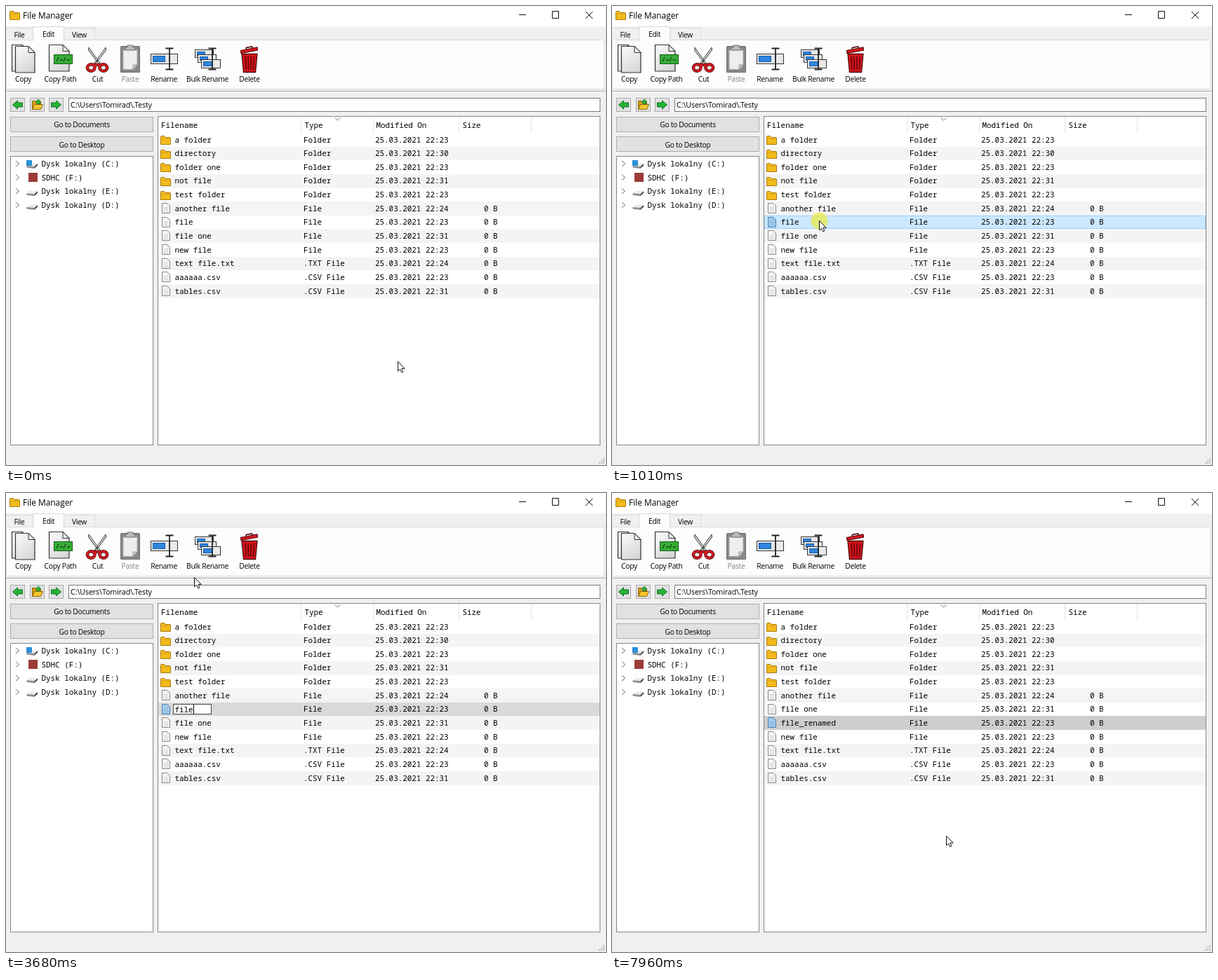
Recreate the animation shown at these times as an HTML page with a canvas. Size 855 by 655 pixels, loop 8000 ms.

```html
<!DOCTYPE html>
<html lang="en">
<head>
<meta charset="utf-8">
<title>File Manager</title>
<style>
html, body { margin: 0; width: 100%; height: 100%; overflow: hidden; background: #f0f0f0; }
canvas { display: block; }
</style>
</head>
<body>
<canvas id="stage" width="855" height="655"></canvas>
<script>
const ctx = document.getElementById('stage').getContext('2d');
const LOOP = 8000, ROW = 19.64, TOP = 181, CHAR = 6.54;
const SANS = '"Open Sans", "Noto Sans", sans-serif';
const MONO = '10.9px "Noto Sans Mono", "DejaVu Sans Mono", monospace';

// Cursor moves: start, end, number of steps, target x and y, bend of x and y
const MOVES = [
  [50, 830, 14, 295, 306, 0.4, -0.1],
  [1260, 1700, 8, 240, 101, 0, 0],
  [2130, 2190, 2, 254, 118, 1.4, 0],
  [3500, 3680, 3, 268, 120, 0, 0],
  [7540, 7960, 8, 476, 489, 0, 0]
];
const CLICKS = [[890, 1070], [1760, 1940]];
const CARET_OFF = [[2500, 3060], [4240, 4740], [6360, 6610]];
const SELECT = 890, EDIT = 1940, RETYPE = 3060, COMMIT = 6610;
const KEYS = [3060, 3190, 3310, 3680, 4870, 5060, 5173, 5287, 5400, 5513, 5627, 5740];
const NEW_NAME = 'file_renamed';

const FILES = [
  ['a folder', 'Folder', 23], ['directory', 'Folder', 30], ['folder one', 'Folder', 23],
  ['not file', 'Folder', 31], ['test folder', 'Folder', 23], ['another file', 'File', 24],
  ['file', 'File', 23], ['file one', 'File', 31], ['new file', 'File', 23],
  ['text file.txt', '.TXT File', 24], ['aaaaaa.csv', '.CSV File', 23], ['tables.csv', '.CSV File', 31]
];
const RENAMED = FILES.slice();
RENAMED[6] = FILES[7];
RENAMED[7] = [NEW_NAME, 'File', 23];

const within = (t, spans) => spans.some(([a, b]) => t >= a && t < b);

function box(x, y, w, h, fill, line) {
  ctx.fillStyle = fill;
  ctx.fillRect(x, y, w, h);
  if (line) {
    ctx.strokeStyle = line;
    ctx.lineWidth = 1;
    ctx.strokeRect(x + 0.5, y + 0.5, w - 1, h - 1);
  }
}

function shape(d, fill, line, width = 1) {
  const path = new Path2D(d);
  if (fill) { ctx.fillStyle = fill; ctx.fill(path); }
  if (line) { ctx.strokeStyle = line; ctx.lineWidth = width; ctx.stroke(path); }
}

function mono(str, x, y, color = '#000') {
  ctx.font = MONO;
  ctx.letterSpacing = '0px';
  ctx.textAlign = 'left';
  ctx.fillStyle = color;
  ctx.fillText(str, x, y);
}

function sans(str, x, y, { size = 10.3, gap = -0.3, align = 'center', color = '#000' } = {}) {
  ctx.font = size + 'px ' + SANS;
  ctx.letterSpacing = gap + 'px';
  ctx.textAlign = align;
  ctx.fillStyle = color;
  ctx.fillText(str, x, y);
}

function at(x, y, draw) {
  ctx.save();
  ctx.translate(x, y);
  draw();
  ctx.restore();
}

const folder = (x, y) => at(x, y, () => {
  shape('M.5 12.5V1.5Q.5 .5 1.5 .5H5.5L7 2.5H13.5Q14.5 2.5 14.5 3.5V12.5Z', '#f3bb1c', '#a87b10');
  shape('M1.5 4.5H14', null, '#dba414');
});

const page = (x, y, blue) => at(x, y, () => {
  shape('M.5 .5H8L11.5 4V14.5H.5Z', blue ? '#a3cdf0' : '#f8f8f8', blue ? '#4d7fa8' : '#858585');
  shape('M8 .5V4H11.5M2.5 6.5H9.5M2.5 8.5H9.5M2.5 10.5H9.5M2.5 12.5H9.5', null, blue ? '#8db9dc' : '#d4d4d4');
});

const sheet = (x, y, w, h) => at(x, y, () => {
  const g = ctx.createLinearGradient(0, 0, w, h);
  g.addColorStop(0, '#fcfcfc');
  g.addColorStop(1, '#d2d2d2');
  const c = w - 9;
  shape(`M.5 .5H${c}L${w} 9.5V${h}H.5Z`, g, '#333', 1.2);
  shape(`M${c} .5V9.5H${w}Z`, '#eee', '#333');
});

const drive = (x, y) => at(x, y, () => {
  shape('M0 3.5L5 0H15.5L11 4.5Z', '#e9e9e9');
  shape('M0 3.5L11 4.5V7.5L0 6Z', '#8b8d8f');
  shape('M11 4.5L15.5 .5V3L11 7.5Z', '#3f4244');
});

function field(x, y, w, h) {
  box(x, y, w, h, '#e9e9e9', '#333');
  box(x + 3, y + 3, Math.round(w * 0.45), h - 6, '#2f86de', '#1a5ca5');
}

function beam(x, top, bottom) {
  shape(`M${x - 5.5} ${top}H${x + 5.5}M${x} ${top}V${bottom}M${x - 5.5} ${bottom}H${x + 5.5}`, null, '#222', 1.8);
}

function scissors() {
  for (const side of [1, -1]) at(130, 0, () => {
    ctx.scale(side, 1);
    shape('M12 59L12.5 63L-1.5 82L-4.5 82Z', '#c9cccf', '#333', 0.9);
    const ring = 'M3.5 87A5.2 4.6 0 1 0 14 89A5.2 4.6 0 1 0 3.5 87L1 82';
    shape(ring, null, '#4a0b0e', 4.4);
    shape(ring, null, '#d71920', 2.8);
  });
  box(129, 77, 2, 2, '#333');
}

function clipboard() {
  shape('M163.5 59Q163.5 57.5 165 57.5H189Q190.5 57.5 190.5 59V94.5H163.5Z', '#888', '#6f6f6f');
  shape('M167 63H187V84L181 90.5H167Z', '#eee', '#aaa');
  shape('M187 84H181V90.5Z', '#ccc', '#999');
  shape('M170 63V59H173V56H181V59H184V63Z', '#bbb', '#777');
}

function trash() {
  shape('M336 68.5H358L355.5 94.5H338.5Z', '#d8141b', '#4f080b', 1.3);
  shape('M341 72L342 91M345 72L345.5 91M349.3 72L349 91M353.5 72L352.5 91', null, '#65090d', 1.7);
  shape('M334.5 63.5L358 59L358.5 63L335 67.5Z', '#e2171e', '#4f080b', 1.2);
  shape('M342 61.5L342.5 59.5L350.5 58L351.5 60', null, '#4f080b', 1.7);
}

function toolbar(hover) {
  if (hover === 'rename') box(200, 51, 51, 62, '#e0f0fd');
  if (hover === 'bulk') box(251, 51, 73, 62, '#e0f0fd');
  sheet(8, 55, 24, 38);
  sheet(13, 57, 28, 38);
  sheet(61, 55, 29, 38);
  box(68, 69, 27, 14, '#35ad35', '#195c19');
  shape('M72 79L75 73M77 77H81M82 79L85 73M87 77H91', null, '#111');
  scissors();
  clipboard();
  field(206, 68, 39, 15);
  beam(233, 60.5, 90.5);
  field(269, 62, 27, 12);
  field(273, 69, 27, 12);
  field(278, 76, 28, 13);
  beam(294, 60.5, 90.5);
  trash();
  const labels = [['Copy', 24.5], ['Copy Path', 77.5], ['Cut', 130.5], ['Paste', 177],
    ['Rename', 225], ['Bulk Rename', 287], ['Delete', 347]];
  for (const [name, x] of labels) sans(name, x, 108, { color: name === 'Paste' ? '#7d877d' : '#000' });
}

function frame() {
  box(0, 0, 855, 655, '#f0f0f0');
  box(0, 0, 855, 29, '#fff');
  folder(5, 7);
  sans('File Manager', 24, 17.5, { size: 11.9, gap: 0, align: 'left' });
  shape('M731 12.5H741M778.5 7.5H787.5V17.5H778.5ZM826 8L836 18M836 8L826 18', null, '#111');

  box(0, 48, 853, 71, '#fdfdfd', '#dcdcdc');
  box(-1, 31, 40, 18, '#f0f0f0', '#d9d9d9');
  box(82, 31, 45, 18, '#f0f0f0', '#d9d9d9');
  box(38, 29, 45, 21, '#fdfdfd', '#d9d9d9');
  box(39, 47, 43, 4, '#fdfdfd');
  sans('File', 19, 44.5);
  sans('Edit', 60.5, 43.5);
  sans('View', 104.5, 44.5);
  box(0, 121, 855, 1, '#a6a6a6');
  box(0, 122, 855, 1, '#fafafa');
  for (let i = 0; i < 3; i++)
    for (let j = 0; j <= i; j++) box(851 - j * 3, 645 + i * 3, 2, 2, '#bcbcbc');
}

function navigation(hover) {
  for (const x of [6, 34, 61]) box(x, 131, 21, 20, '#e1e1e1', '#adadad');
  const arrow = 'M-7 0L0 -6V-3H7V3H0V6Z';
  at(16.5, 141, () => shape(arrow, '#25b534', '#15702a'));
  at(71.5, 141, () => { ctx.scale(-1, 1); shape(arrow, '#25b534', '#15702a'); });
  shape('M37.5 147.5V135.5H42L43.5 137.5H49.5V147.5Z', '#d69d14', '#8a6710');
  shape('M37.5 147.5L40.5 140.5H52.5L49.5 147.5Z', '#f6c52d', '#8a6710');
  shape('M44 140V137H42L46 133L50 137H48V140Z', '#2fb53b', '#176f23', 0.7);
  box(89, 131, 758, 20, '#fff', hover ? '#171717' : '#7a7a7a');
  sans('C:\\Users\\Tomirad\\.Testy', 92, 145, { size: 10.8, gap: -0.15, align: 'left' });
}

function sidebar() {
  box(6, 158, 204, 22, '#e1e1e1', '#adadad');
  box(6, 186, 204, 22, '#e1e1e1', '#adadad');
  sans('Go to Documents', 108, 173);
  sans('Go to Desktop', 108, 201.5);
  box(6, 214, 204, 413, '#fff', '#828790');
  ['Dysk lokalny (C:)', 'SDHC (F:)', 'Dysk lokalny (E:)', 'Dysk lokalny (D:)'].forEach((name, i) => {
    const y = 225 + i * ROW;
    shape(`M14 ${y - 4}L18.5 ${y}L14 ${y + 4}`, null, '#999', 1.2);
    if (i === 1) box(32, 238, 13, 13, '#9c3b38');
    else drive(29.5, y - 0.5);
    if (i === 0) box(29, 220, 8, 8, '#2a91d8');
    mono(name, 50.5, y + 4);
  });
}

function editor(t, y) {
  const typed = t < RETYPE ? 'file' : NEW_NAME.slice(0, KEYS.filter(k => t >= k).length);
  const end = 241 + typed.length * CHAR;
  const width = 54 + Math.max(0, typed.length - 4) * CHAR;
  box(238, 301, Math.round(width) + 1, 15, '#fff', '#444');
  if (t < RETYPE) box(240, 302, 27, 13, '#0078d7');
  mono(typed, 240.5, y + 14, t < RETYPE ? '#fff' : '#000');
  if (!within(t, CARET_OFF)) box(Math.floor(end), 302, 1, 13, '#000');
}

function table(t, x, y) {
  box(216, 157, 631, 470, '#fff', '#828790');
  for (const sep of [420, 523, 645, 748]) box(sep, 158, 1, 23, '#e4e4e4');
  shape('M468.5 159.5L472.5 163L476.5 159.5', null, '#777');
  [['Filename', 221], ['Type', 425.5], ['Modified On', 527.5], ['Size', 650.5]]
    .forEach(([name, left]) => mono(name, left, 173.5));

  const done = t >= COMMIT, editing = t >= EDIT && !done;
  const chosen = t < SELECT ? -1 : done ? 7 : 6;
  const under = x > 216 && x < 846 ? Math.floor((y - TOP) / ROW) : -1;
  (done ? RENAMED : FILES).forEach(([name, type, minute], i) => {
    const top = TOP + i * ROW, base = top + 13.5;
    const y0 = Math.round(top), h = Math.round(top + ROW) - y0;
    const picked = i === chosen;
    if (picked && t < EDIT) box(217, y0, 629, h, '#cce8ff', '#99d1ff');
    else if (picked) box(217, y0, 629, h, done ? '#cecece' : '#d9d9d9');
    else if (i === under) box(217, y0, 629, h, '#dceaf5');
    else if (i % 2) box(217, y0, 629, h, '#f4f4f4');

    if (type === 'Folder') folder(220, y0 + 4);
    else page(222, y0 + 2, picked);
    if (picked && editing) editor(t, top);
    else mono(name, 240.5, base);
    mono(type, 424, base);
    mono(`25.03.2021 22:${minute}`, 526, base);
    if (type !== 'Folder') mono('0 B', 681, base);
  });
}

function pointer(t) {
  let x = 558, y = 507;
  for (const [start, end, steps, tx, ty, bx, by] of MOVES) {
    if (t < start) break;
    const k = Math.floor((t - start) / (end - start) * (steps - 1) + 1e-6) + 1;
    const u = Math.min(1, k / steps), p = u * u * (3 - 2 * u), bend = p * (1 - p);
    x += (tx - x) * (p + bx * bend);
    y += (ty - y) * (p + by * bend);
  }
  return [Math.round(x), Math.round(y)];
}

function cursor(t, x, y) {
  if (within(t, CLICKS)) {
    ctx.fillStyle = 'rgba(240, 236, 50, .66)';
    ctx.beginPath();
    ctx.arc(x + 0.5, y + 0.5, 12, 0, 7);
    ctx.fill();
  }
  at(x + 0.5, y + 0.5, () => shape('M0 0V13.5L3.1 10.7L5.2 15.3L7.4 14.3L5.4 9.8H9.6Z', '#fff', '#111'));
}

function draw(t) {
  const [x, y] = pointer(t);
  const onTool = y >= 51 && y < 113 && x >= 200 && x < 324;
  frame();
  toolbar(onTool ? (x < 251 ? 'rename' : 'bulk') : '');
  navigation(x >= 89 && y >= 131 && y < 151);
  sidebar();
  table(t, x, y);
  cursor(t, x, y);
}

const start = performance.now();
function tick() {
  draw((performance.now() - start) % LOOP);
  requestAnimationFrame(tick);
}
tick();
</script>
</body>
</html>
```
